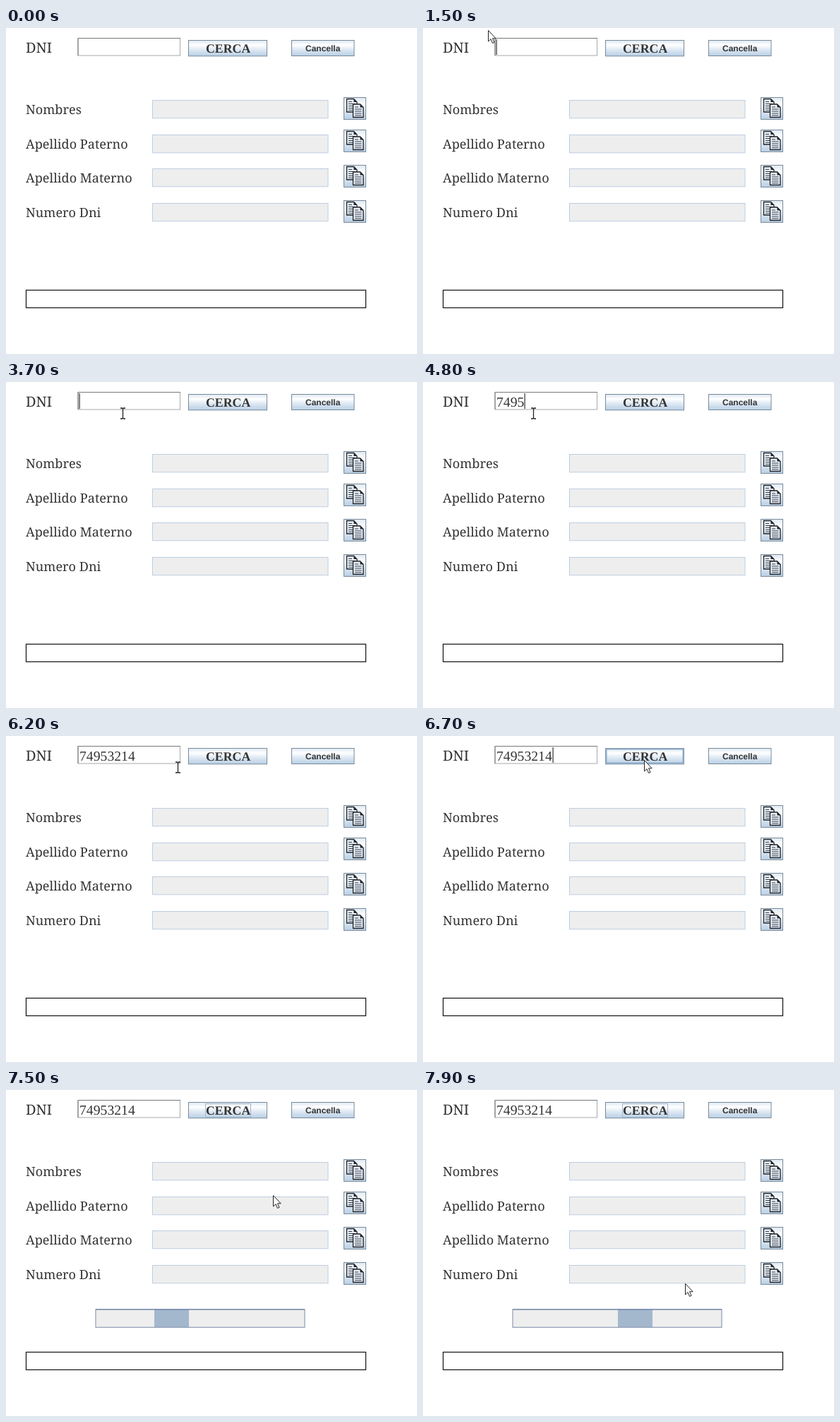
Recreate the animation shown at these times as an HTML page. Size 582x462 px, loop 8000 ms.

```html
<!DOCTYPE html>
<html lang="es">
<head>
<meta charset="utf-8">
<title>DNI</title>
<style>
  html, body { margin: 0; width: 100%; height: 100%; overflow: hidden; background: #fff; }
  svg { display: block; width: 582px; height: 462px; }
  text { fill: #333; white-space: pre; text-rendering: geometricPrecision; }
  .label { font: 18.1px "Noto Serif", serif; }
  .title { font: 20px "Noto Serif", serif; }
  .value { font: 19.7px "Liberation Serif", serif; }
  .search { font: bold 17.8px "Liberation Serif", serif; }
  .clear { font: bold 12px "Liberation Sans", sans-serif; }
  .button { fill: url(#shine); stroke: #7a8a99; }
  .field { fill: #eee; stroke: #bccee0; }
</style>
</head>
<body>
<svg viewBox="0 0 582 462">
  <defs>
    <linearGradient id="shine" x2="0" y2="1">
      <stop offset="0" stop-color="#dde8f3"/>
      <stop offset=".3" stop-color="#fff"/>
      <stop offset=".6" stop-color="#dde8f3"/>
      <stop offset="1" stop-color="#b8cfe5"/>
    </linearGradient>
    <g id="page">
      <path d="M.5 .5H10.5L15 5V19H.5Z" fill="#e4edf6" stroke="#1f2126" stroke-width="1.3"/>
      <path d="M10.5 .5V5H15Z" fill="#1f2126"/>
      <path d="M3 4.5H8M3 7.5H12.5M3 10.5H12.5M3 13.5H12.5M3 16.3H12.5" stroke="#3a3e46"/>
    </g>
    <g id="copy">
      <rect class="button" x=".5" y=".5" width="31" height="31"/>
      <use href="#page" x="4" y="2"/>
      <use href="#page" x="13" y="9.5"/>
    </g>
  </defs>
  <rect width="582" height="462" fill="#fff"/>

  <text class="title" x="28" y="35">DNI</text>
  <rect x="102" y="14.5" width="144.5" height="24.5" fill="#fff" stroke="#a5a8ac"/>
  <path d="M102 39V14.5H247" fill="none" stroke="#74777b"/>
  <text class="value" id="digits" x="104" y="35"></text>
  <rect id="caret" y="16" width="1.2" height="22" fill="#333"/>

  <rect class="button" x="258.5" y="17.5" width="111" height="22.3"/>
  <rect id="hover" x="259.5" y="18.5" width="109" height="20" fill="none" stroke="#8fadca" stroke-width="2"/>
  <rect id="focus" x="282.5" y="19.5" width="64" height="19" fill="none" stroke="#a3b8cc"/>
  <text class="search" x="283" y="35">CERCA</text>
  <rect class="button" x="404.5" y="17.5" width="88.5" height="22"/>
  <text class="clear" x="424" y="33">Cancella</text>

  <g id="rows"></g>

  <g id="progress">
    <rect x="127" y="311" width="296" height="25" fill="#eee"/>
    <rect id="block" y="311" width="49" height="25" fill="#a3b8cc"/>
    <rect x="127" y="311" width="296" height="25.3" fill="none" stroke="#7a8aa6"/>
    <path d="M127 311H423" stroke="#637ca3"/>
  </g>
  <rect x="28.5" y="371.5" width="481" height="25" fill="#fff" stroke="#111" stroke-width="1.2"/>

  <path id="arrow" d="M.5 .5V16L4 12.7L6.5 18.5L9 17.4L6.5 11.8H11.2Z" fill="#fff" stroke="#222"/>
  <path id="beam" d="M-3 -7H-.5L.5 -6L1.5 -7H4M.5 -6V7M-3 8H-.5L.5 7L1.5 8H4" fill="none" stroke="#222" stroke-width="1.3"/>
</svg>
<script>
const LOOP = 8000, STEP = 100;
const $ = id => document.getElementById(id);

// label, text baseline, field top, icon top
const rows = [
  ["Nombres", 122, 102, 98],
  ["Apellido Paterno", 171, 151, 144],
  ["Apellido Materno", 219, 199, 194],
  ["Numero Dni", 268, 248, 244]
];
$("rows").innerHTML = rows.map(([name, base, top, icon]) => `
  <text class="label" x="28" y="${base}">${name}</text>
  <rect class="field" x="207.5" y="${top + .5}" width="248.5" height="25.3"/>
  <use href="#copy" x="478" y="${icon}"/>`).join("");

const number = "74953214";
const typed = [4300, 4500, 4600, 4800, 5000, 5100, 5300, 5300];
const caretOn = [[1500, 2000], [2500, 3000], [3500, 4100], [4300, 5800], [6300, 6800]];

// time, x, y, shape; an empty shape hides the pointer
const pointer = [
  [0, 92, 3, ""],
  [1500, 92, 3, "arrow"],
  [1600, 92, 3, ""],
  [3300, 195, 47, "arrow"],
  [3500, 182, 44, "beam"],
  [3800, 156, 44, "beam"],
  [6000, 156, 44, "beam"],
  [6200, 243, 44, "beam"],
  [6300, 270, 40, "arrow"],
  [6600, 313, 34, "arrow"],
  [7100, 313, 34, "arrow"],
  [7700, 410, 206, "arrow"],
  [7900, 371, 274, "arrow"],
  [8000, 371, 274, "arrow"]
];

const show = (id, on) => $(id).style.display = on ? "" : "none";
const within = (t, spans) => spans.some(([a, b]) => t >= a && t < b);

function pointerAt(t) {
  const i = pointer.findLastIndex(p => p[0] <= t);
  const [t0, x0, y0, shape] = pointer[i];
  const [t1, x1, y1] = pointer[i + 1];
  const k = (t - t0) / (t1 - t0);
  return { x: x0 + (x1 - x0) * k, y: y0 + (y1 - y0) * k, shape };
}

function draw(t) {
  const count = typed.filter(at => at <= t).length;
  $("digits").textContent = number.slice(0, count);
  $("caret").setAttribute("x", 103.5 + 10 * count);
  show("caret", within(t, caretOn));

  const p = pointerAt(t);
  for (const id of ["arrow", "beam"]) {
    show(id, p.shape === id);
    $(id).setAttribute("transform", `translate(${Math.round(p.x)} ${Math.round(p.y)})`);
  }
  show("hover", within(t, [[6300, 7200]]));
  show("focus", t >= 6800);

  show("progress", t >= 6900);
  $("block").setAttribute("x", Math.round(127.5 + Math.max(0, t - 7000) * 247 / 1500));
}

const start = performance.now();
function tick() {
  const t = (performance.now() - start) % LOOP;
  draw(Math.floor(t / STEP) * STEP);
  requestAnimationFrame(tick);
}
tick();
</script>
</body>
</html>
```
